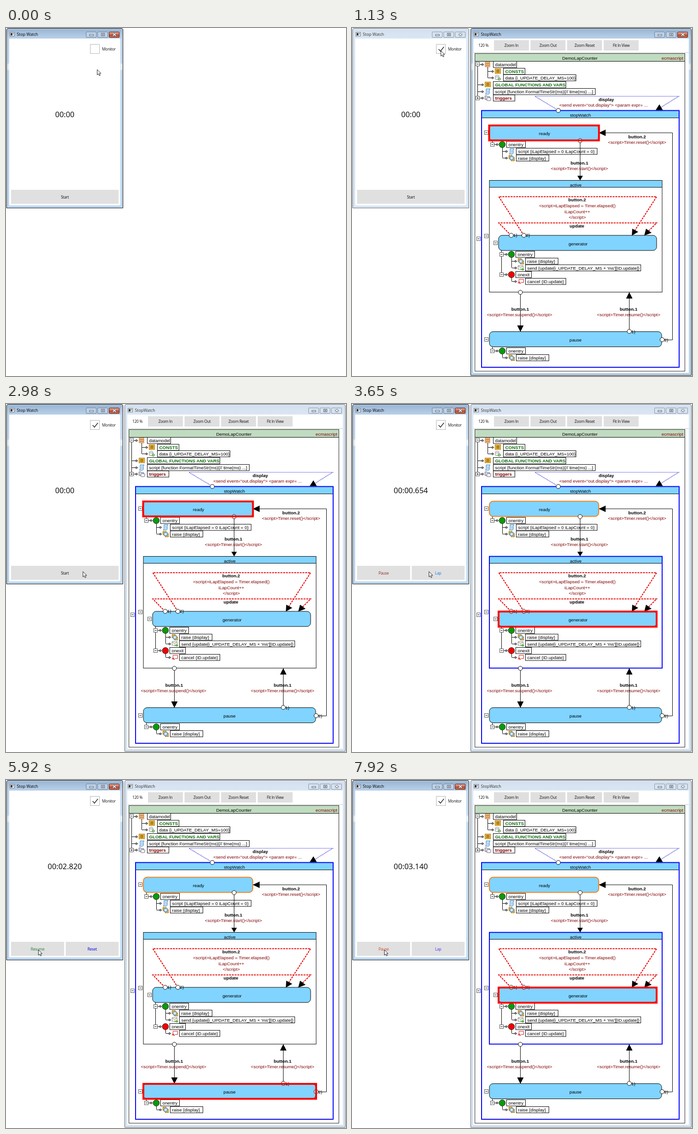
These frames come from a looping animation (740x757 px, 7.99 s). An HTML page:

```html
<!DOCTYPE html>
<html lang="en">
<head>
<meta charset="utf-8">
<title>Stop watch with state chart</title>
<style>
  html, body { margin: 0; width: 100%; height: 100%; overflow: hidden; background: #fff; }
  svg { display: block; width: 740px; height: 757px; }
  text { font: 9.75px "Liberation Sans", Arial, sans-serif; fill: #000; white-space: pre; }
  .mid { text-anchor: middle; }
  .bold { font-weight: bold; }
  .green { font-weight: bold; fill: #0b6b0b; }
  .maroon { fill: #800000; }
  .ui { font: 8.5px "Open Sans", "Noto Sans", sans-serif; letter-spacing: -.33px; fill: #111; }
  .title { font: 8.8px "Open Sans", "Noto Sans", sans-serif; fill: #333; }
  .time { font: 16.4px "Open Sans", "Noto Sans", sans-serif; }
  .line { fill: none; stroke: #000; }
  .frame { fill: url(#dim); stroke: #5a6068; }
  .btn { fill: #d7e3f0; stroke: #8796a8; }
  .on .frame { fill: url(#lit); stroke: #000; }
  .on .title { fill: #000; }
  .on .btn { fill: #bdd1e7; stroke: #6a8099; }
  .on .close { fill: url(#red); stroke: #5c1f16; }
  .glyph { fill: #fff; stroke: #4c5664; }
  .hot { fill: none; stroke: #f00; stroke-width: 4; }
  .dash { fill: none; stroke: #e80000; stroke-width: 2; stroke-dasharray: 4 2; }
</style>
</head>
<body>
<svg id="stage" viewBox="0 0 740 757"></svg>
<script>
const LOOP = 7990, OPEN = 1130, PRESS = 2910, START = 2996, PAUSE = 5830, RESUME = 7600;
const SKY = '#80d4ff';

// --- markup helpers ---
const esc = s => s.replace(/&/g, '&amp;').replace(/</g, '&lt;');
const rect = (x, y, w, h, attrs) => `<rect x="${x}" y="${y}" width="${w}" height="${h}" ${attrs}/>`;
const path = (d, attrs = 'class="line"') => `<path d="${d}" ${attrs}/>`;
const text = (x, y, s, cls = '', attrs = '') => `<text x="${x}" y="${y}" class="${cls}" ${attrs}>${esc(s)}</text>`;
const label = (x, y, s, cls = '') => text(x, y, s, 'mid ' + cls);
const ring = (x, y) => `<circle cx="${x}" cy="${y}" r="4.6" fill="#fff" stroke="#000"/>`;
const head = d => path(d + 'z', '');
const group = (id, body, attrs = '') => `<g id="${id}" ${attrs}>${body}</g>`;

function win(x, w, h, title) {
  const r = x + w;
  const button = (bx, cls, glyph) =>
    rect(bx + .5, 8.5, 22, 12, `rx="1.5" class="btn ${cls}"`) +
    `<g transform="translate(${bx + 12} 14.5)">${glyph}</g>`;
  return path(`M${x + .5} ${h - .5}V5q0-4.5 4.5-4.5H${r - 5}q4.5 0 4.5 4.5V${h - .5}z`, 'class="frame"') +
    path(`M${x + 1.5} ${h - 1.5}V5q0-3.5 3.5-3.5H${r - 5}q3.5 0 3.5 3.5V${h - 1.5}z`,
      'fill="none" stroke="#fff" stroke-opacity=".45"') +
    rect(x + 6, 23, w - 12, h - 29, 'fill="#fff"') +
    rect(x + 7.5, 9.5, 10, 8, 'fill="#fff" stroke="#69747f"') +
    rect(x + 9, 11, 4, 5, 'fill="#333"') + rect(x + 14, 11, 2, 3, 'fill="#789"') +
    text(x + 22.5, 17.3, title, 'title') +
    button(r - 81, '', rect(-4, -.5, 8, 3, 'class="glyph"')) +
    button(r - 56, '', rect(-3.5, -3, 7, 5.5, 'class="glyph"') + rect(-1.2, -1.2, 2.4, 2, 'class="glyph"')) +
    button(r - 31, 'close', path('M-3-2.8L3 2.4M3-2.8L-3 2.4', 'stroke="#4c5664" stroke-width="3.4"') +
      path('M-3-2.8L3 2.4M3-2.8L-3 2.4', 'stroke="#fff" stroke-width="1.7"'));
}

const icons = {
  stack: [0, 4, 8].map(y => rect(.5, y + .2, 11, 3.4, 'rx="1.5" fill="#f4c48c" stroke="#a85a20" stroke-width=".8"')).join(''),
  list: rect(.5, .5, 12, 10.5, 'fill="#f2bd3c" stroke="#a87414"') +
    path('M3 3.5h7M3 5.8h7M3 8.1h7', 'stroke="#5c3c00"'),
  data: path('M1 2.5v7q4 2.4 8 0v-7', 'fill="#f4f4f4" stroke="#888"') +
    '<ellipse cx="5" cy="2.5" rx="4" ry="1.8" fill="#fff" stroke="#888"/><circle cx="9.5" cy="9" r="3" fill="#3a9c3a"/>' +
    path('M9.5 7.3v3.4M7.8 9h3.4', 'stroke="#fff"'),
  scroll: path('M3 .5h9q-2 1-2 3v6q0 2-2 2.5H1q2-1 2-3z', 'fill="#d8efff" stroke="#2a74b4"') +
    path('M5 4h3.5M5 6.3h3.5M5 8.6h3.5', 'stroke="#5a9cd0" stroke-width=".8"'),
  folder: path('M.5 9.5v-8h4l1 1.5h5v6.5z', 'fill="#d8dce8" stroke="#667"') +
    rect(4.5, 5.5, 8.5, 6.5, 'rx="1" fill="#f4f4fa" stroke="#667"'),
  raise: rect(.5, .5, 7, 7, 'fill="#f6c850" stroke="#9a6c10"') + rect(5.5, 5.5, 7, 7, 'fill="#f6c850" stroke="#9a6c10"') +
    rect(3, 3, 7, 7, 'fill="#cfe8fa" stroke="#2a6ca4"'),
  send: rect(.5, 1.5, 11, 8, 'fill="#fafaf0" stroke="#888"') + path('M.5 1.5l5.5 4.5 5.5-4.5', 'fill="none" stroke="#888"') +
    path('M6 8.2h4v-2l4 3.4-4 3.2v-2H6z', 'fill="#4caa3c"'),
  cancel: path('M2.5 1.5h10v7h-5l-3 3v-3h-2z', 'fill="#fff" stroke="#d02020"') + path('M0 7l4 4M4 7l-4 4', 'stroke="#d02020"')
};

const toggle = (x, y, plus) => rect(x - 3.5, y - 3.5, 8, 8, 'fill="#fff" stroke="#555"') +
  path(`M${x - 1.5} ${y + .5}h4` + (plus ? 'm-2-2v4' : ''));

const arrow = (x, y, tip) => path(`M${x + .5} ${y + .5}H${tip - 4}`) +
  path(`M${tip - 4} ${y - 1.7}l4 2.2-4 2.2z`, 'fill="#fff" stroke="#000"');

const tag = (x, y, w, s, cls) => rect(x + .5, y - 6.5, w, 13.5, 'fill="#fff" stroke="#000"') +
  text(x + 4.5, y + 4, s, cls);

// Tree entry: connector, icon and boxed text, spaced by the step a
const leaf = (vx, y, icon, w, s, cls = '', a = 16) => arrow(vx, y, vx + a - 2) +
  `<g transform="translate(${vx + a} ${y - 6})">${icons[icon]}</g>` + tag(vx + 2 * a + 2, y, w, s, cls);

function action(x, y, name, color, w, items) {
  const drop = items.length * 14.5;
  return path(`M${x - 21.5} ${y - 8}v8M${x + .5} ${y}v${drop}`) + arrow(x - 18, y, x - 8) + toggle(x - 22, y) +
    `<circle cx="${x}" cy="${y + .5}" r="6.8" fill="${color}" stroke="#222"/>` + tag(x + 9, y, w, name) +
    items.map(([icon, bw, s], i) => leaf(x, y + 15 + i * 14.5, icon, bw, s, '', 14)).join('');
}

const state = (x, y, w, name, stroke = '#000', sw = 1, tx = x + w / 2) =>
  rect(x, y, w, 33, `rx="8" fill="${SKY}" stroke="${stroke}" stroke-width="${sw}"`) + label(tx, y + 21.5, name);

const script = s => `<script>${s}<\/script>`;
const edge = (x, y, name, code, cx = x) => label(x, y, name, 'bold') + label(cx, y + 12.4, script(code), 'maroon');
const hot = (id, x, y, w, h) => rect(x, y, w, h, `id="${id}" class="hot"`);

function chart() {
  const onGreen = '#0a9a0a';
  return rect(267.5, 55.5, 457, 691, 'fill="#fff" stroke="#222"') +
    rect(268, 56, 456, 16, 'fill="#c0dcc0"') + path('M268 72.5h456') +
    label(496, 69, 'DemoLapCounter') + text(721, 68.5, 'ecmascript', 'maroon', 'text-anchor="end"') +
    // data tree
    path('M273.5 79V152M295.5 85V108') +
    leaf(273, 79, 'stack', 51, 'datamodel') +
    leaf(295, 94, 'list', 47, 'CONSTS', 'green') +
    leaf(295, 108, 'data', 158, 'data {i_UPDATE_DELAY_MS=100}') +
    leaf(273, 123, 'list', 158, 'GLOBAL FUNCTIONS AND VARS', 'green') +
    leaf(273, 138, 'scroll', 222, 'script {function FormatTimeStr(ms){// time(ms) ...}') +
    leaf(273, 152, 'folder', 47, 'triggers', 'bold maroon') +
    toggle(273, 78) + toggle(273, 152, true) +
    // outer state
    rect(282, 179.5, 430, 558.5, 'fill="#fff"') + rect(282, 180, 430, 15, `fill="${SKY}"`) + path('M282 195.5h430') +
    rect(282, 179.5, 430, 558.5, 'fill="none" stroke="#00f" stroke-width="2"') + label(497, 193, 'stopWatch') +
    path('M449 179L398 148.5H711L664 178', 'fill="none" stroke="#00c" stroke-width="1.2" stroke-dasharray="1.5 1.5"') +
    head('M661 178.5L669 166l7.5 12.5') + ring(449, 179.5) +
    label(553.5, 158.5, 'display', 'bold') +
    label(547.5, 171, '<send event="out.display"> <param expr= ...', 'maroon') +
    // ready
    state(299, 211.5, 238, 'ready', '#f58220', 2, 419) + toggle(292, 227) +
    action(327, 253, 'onentry', onGreen, 41, [
      ['scroll', 176, 'script {iLapElapsed = 0 iLapCount = 0}'], ['raise', 71, 'raise {display}']]) +
    path('M496.5 245V325') + ring(496.5, 245) + head('M490.5 321.5h12l-6 10') +
    edge(495, 297, 'button.1', 'Timer.start()') +
    path('M675 678.5H697.5V228H550') + head('M537 228l15-7v14') +
    edge(620.5, 240, 'button.2', 'Timer.reset()') +
    // active
    rect(299, 331.5, 376, 15, `fill="${SKY}"`) + path('M299 346.5h376') +
    rect(299, 331.5, 376, 243, 'id="active" fill="none"') + label(487, 345, 'active') +
    toggle(292, 452) + toggle(275, 458) + toggle(312, 467) +
    state(319, 451, 344, 'generator', '#000', 1, 492) +
    path('M374 451L319.5 367H663L612 446M346 451L319.5 424H663L640 447', 'class="dash"') +
    head('M609 451.5l1-15 13 7') + head('M636 451.5l4-15 12 9') +
    ring(346.5, 451) + ring(374, 451) + text(351, 454, '1)') + text(378.5, 454, '2)') +
    label(490, 377, 'button.2', 'bold') +
    ['<script>iLapElapsed = Timer.elapsed()', 'iLapCount++', '<\/script>']
      .map((s, i) => label(490.5, 390 + i * 12.5, s, 'maroon')).join('') +
    label(489.5, 434, 'update', 'bold') +
    action(347, 536, 'onexit', '#f00000', 34, [['cancel', 88, 'cancel {ID.update}']]) +
    path('M325.5 492V532') +
    action(347, 492, 'onentry', onGreen, 41, [
      ['raise', 71, 'raise {display}'], ['send', 251, "send {update[i_UPDATE_DELAY_MS + 'ms'][ID.update]}"]]) +
    // pause
    path('M366.5 575V650M603.5 660V586') +
    state(299, 660.5, 375, 'pause') + toggle(292, 677) +
    ring(366.5, 575) + head('M359.5 647h14l-7 14') + edge(366, 615, 'button.1', 'Timer.suspend()', 364.5) +
    head('M603.5 574.5l-7 14h14') + ring(603.5, 660) + edge(602, 615, 'button.1', 'Timer.resume()') +
    ring(675, 678) + text(608, 663.5, '1)') + text(679.5, 681.5, '2)') +
    action(327, 702, 'onentry', onGreen, 41, [['raise', 71, 'raise {display}']]) +
    hot('hotReady', 298.5, 212, 239, 32.5) + hot('hotRun', 319, 451.5, 344, 33) + hot('hotPause', 299, 661, 376, 32.5);
}

const gradient = (id, y2, stops) => `<linearGradient id="${id}" gradientUnits="userSpaceOnUse" x1="0" y1="0" x2="0" y2="${y2}">` +
  stops.map(([y, c]) => `<stop offset="${y / y2}" stop-color="${c}"/>`).join('') + '</linearGradient>';

const key = (x, w, id, s) => rect(x, 352, w, 30.5, 'fill="#e0e0e0"') + text(x + w / 2, 370.5, s, 'ui mid', `id="${id}"`);

const $ = id => document.getElementById(id);
$('stage').innerHTML = '<defs>' +
  gradient('lit', 100, [[0, '#96b2d1'], [23, '#b9d1ea'], [76, '#bdd4ec'], [79, '#dfeaf5'], [90, '#dfeaf5'], [92, '#b9d5ef']]) +
  gradient('dim', 100, [[0, '#d3dfec'], [23, '#dae6f3'], [100, '#d7e4f2']]) +
  gradient('red', 21, [[8, '#dfa597'], [14, '#cf7460'], [15, '#b8432a'], [21, '#d07a58']]) + '</defs>' +
  group('watch', win(1, 254, 392, 'Stop Watch') +
    rect(183.5, 35.5, 20, 20, 'fill="#fff" stroke="#b4b4b4"') +
    path('M188.5 46l4 4.5 7.5-9.5', 'id="check" fill="none" stroke="#333" stroke-width="1.7"') +
    text(209, 49, 'Monitor', 'ui') + text(128, 194, '', 'time mid', 'id="time"') +
    group('single', key(11, 234, 'start', 'Start')) +
    group('pair', key(11, 115.5, 'left', '') + key(130, 115, 'right', ''))) +
  group('monitor', win(258, 481, 756, 'StopWatch') + text(275, 41, '120 %', 'ui') +
    ['Zoom In', 'Zoom Out', 'Zoom Reset', 'Fit In View'].map((s, i) =>
      rect(309 + i * 79.6, 26.5, 76, 22.5, 'fill="#dfdfdf"') + label(347 + i * 79.6, 41, s, 'ui')).join('') +
    path('M265 53.5h468', 'stroke="#c8c8c8"') + chart()) +
  path('M.5.5v11.6l2.7-2.5 1.9 4.3 2-.9-1.9-4.1h3.6z', 'id="cursor" fill="#fff" stroke="#223"');

// --- motion ---
const clamp = v => Math.max(0, Math.min(1, v));
const smooth = p => p * p * (3 - 2 * p);
const speedUp = p => p * p;
const slowDown = p => p * (2 - p);

// from, to (ms), easing, start, control and end point
const moves = [
  [300, 740, smooth, [198, 90], [184, 66], [193, 49]],
  [1940, 2650, smooth, [193, 49], [205, 210], [167, 364]],
  [4600, 5310, speedUp, [167, 364], [132, 369], [98, 368]],
  [5310, 5600, slowDown, [98, 368], [84, 369], [70, 369]]
];

function cursorAt(t) {
  const [from, to, ease, a, b, c] = moves.filter(m => t >= m[0]).pop() || moves[0];
  const p = ease(clamp((t - from) / (to - from))), q = 1 - p;
  return a.map((v, i) => q * q * v + 2 * p * q * b[i] + p * p * c[i]);
}

function elapsed(t) {
  if (t >= RESUME) return 2820 + Math.floor((t - RESUME) / 106.6) * 320 / 3;
  if (t >= PAUSE) return 2820;
  const e = t - START;
  return e < 654 ? Math.floor(e / 109) * 109 : 654 + Math.floor((e - 654) / 110) * 110;
}

function clock(t) {
  if (t < START) return '00:00';
  const ms = Math.round(elapsed(t)), pad = (v, n) => String(v).padStart(n, '0');
  return `${pad(Math.floor(ms / 60000), 2)}:${pad(Math.floor(ms / 1000) % 60, 2)}.${pad(ms % 1000, 3)}`;
}

const mix = (a, b, p) => `rgb(${a.map((v, i) => Math.round(v + (b[i] - v) * p))})`;
const show = (id, on) => $(id).setAttribute('visibility', on ? 'visible' : 'hidden');
function caption(id, s, color) {
  $(id).textContent = s;
  $(id).style.fill = color;
}

function draw(t) {
  const idle = t < START, paused = t >= PAUSE && t < RESUME, running = !idle && !paused;
  const watchOn = t < OPEN || t >= PRESS, opened = t >= OPEN;
  $('watch').setAttribute('class', watchOn ? 'on' : '');
  $('monitor').setAttribute('class', watchOn ? '' : 'on');
  $('monitor').style.display = opened ? '' : 'none';
  show('check', t >= 1000);
  show('single', idle);
  show('pair', !idle);
  $('time').textContent = clock(t);
  if (paused) {
    caption('left', 'Resume', '#23803c');
    caption('right', 'Reset', '#0000ee');
  } else {
    const p = clamp((t - (t >= RESUME ? RESUME : START) - 330) / 300);
    caption('left', 'Pause', mix([222, 62, 36], [144, 42, 26], p));
    caption('right', 'Lap', mix([84, 44, 245], [22, 122, 228], p));
  }
  show('hotReady', idle && opened);
  show('hotRun', running);
  show('hotPause', paused);
  $('active').setAttribute('stroke', running ? '#00f' : '#000');
  $('active').setAttribute('stroke-width', running ? 2 : 1);
  $('cursor').setAttribute('transform', `translate(${cursorAt(t).map(v => v.toFixed(1))})`);
}

const begin = performance.now();
function tick() {
  draw((performance.now() - begin) % LOOP);
  requestAnimationFrame(tick);
}
tick();
</script>
</body>
</html>
```
